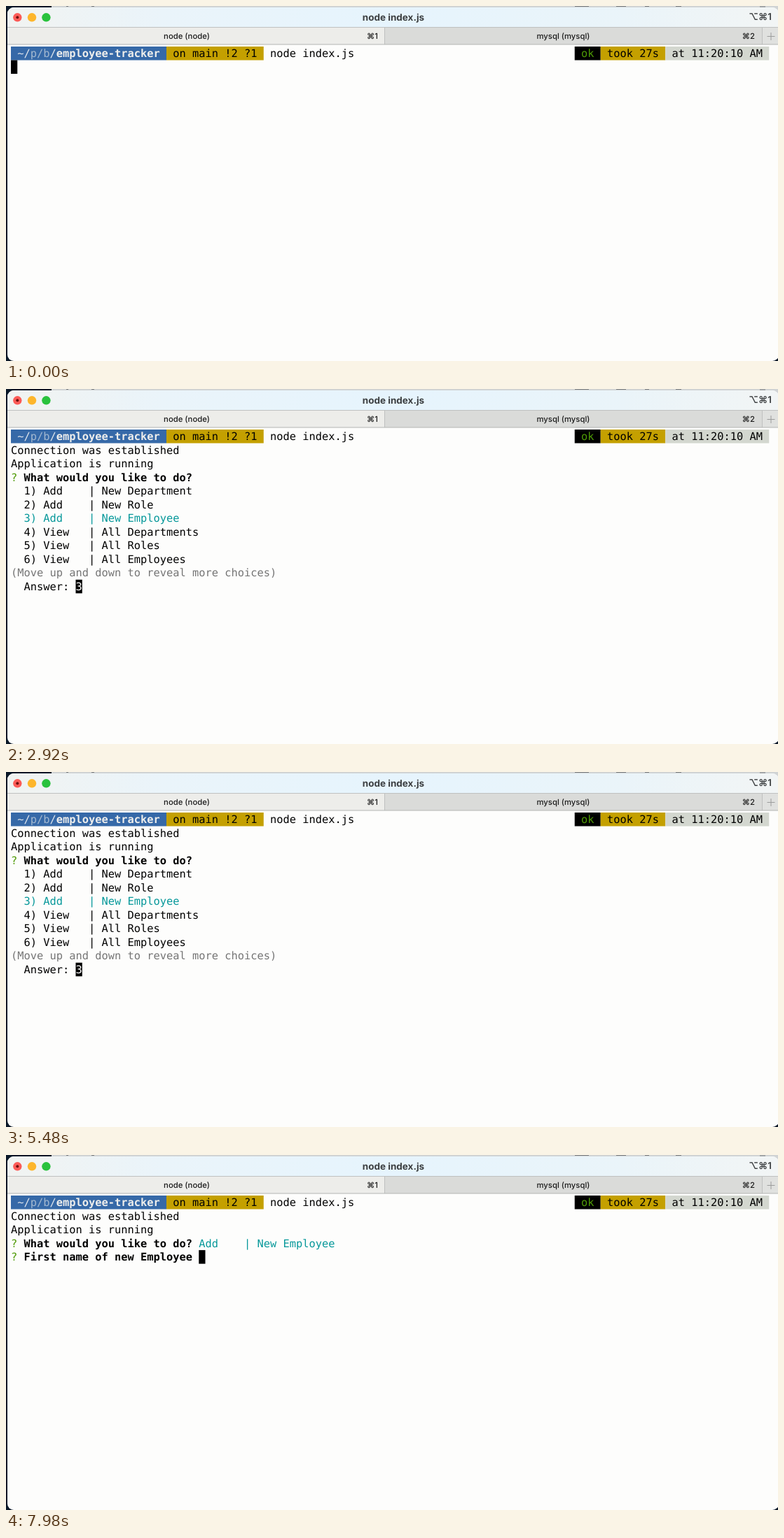
Write an HTML page that moves like this. It is 1102 by 508 pixels and loops after 8 s.

```html
<!DOCTYPE html>
<html lang="en">
<head>
<meta charset="utf-8">
<title>Terminal</title>
<style>
  html, body { margin: 0; width: 100%; height: 100%; overflow: hidden; background: #0b1828; }
  svg { display: block; width: 1102px; height: 508px; }
  text { white-space: pre; text-rendering: geometricPrecision; }
  .mono { font: 15.364px "DejaVu Sans Mono", monospace; }
  .ui { font-family: Inter, "DejaVu Sans", sans-serif; }
  .tab { font-size: 11.3px; font-weight: 500; fill: #1c1c1c; }
  .title { font-size: 13.5px; font-weight: 700; fill: #3c3f41; }
  .bold { font-weight: 700; }
</style>
</head>
<body>
<svg viewBox="0 0 1102 508">
  <defs>
    <linearGradient id="bar">
      <stop offset="0" stop-color="#f1f3f1"/>
      <stop offset=".2" stop-color="#eaf4fa"/>
      <stop offset=".5" stop-color="#e6f4fd"/>
      <stop offset=".8" stop-color="#eaf4f9"/>
      <stop offset="1" stop-color="#f2f5f5"/>
    </linearGradient>
    <clipPath id="window"><rect x="2" y="2" width="1101" height="506" rx="9"/></clipPath>
  </defs>
  <rect width="1102" height="508" fill="#0b1828"/>
  <rect x="65" width="1037" height="12" fill="#d0d3d4"/>
  <path d="M86 .5h3M122 .5h4M812 .5h20M871 .5h14M912 .5h6M956 .5h8M1076 1h8" stroke="#777b7d"/>
  <g clip-path="url(#window)">
    <rect x="2" y="2" width="1101" height="506" fill="#fdfdfc"/>
    <rect x="2" y="2" width="1101" height="29" fill="url(#bar)"/>
    <rect x="2" y="31" width="538" height="24" fill="#ededea"/>
    <rect x="541" y="31" width="539" height="24" fill="#dadbd9"/>
    <rect x="1080" y="31" width="23" height="24" fill="#e0e1df"/>
    <path d="M2 30.5H1103M540.5 31V55M1079.5 31V55" stroke="#bfc1c0" fill="none"/>
    <path d="M2 55H1103" stroke="#b2b4b3"/>
    <path d="M1086.5 43.5h11M1092 38v11" stroke="#9b9c9b"/>
  </g>
  <g>
    <circle cx="16.3" cy="16.3" r="6.2" fill="#fc5b57"/>
    <circle cx="16.3" cy="16.3" r="2" fill="#6d100e"/>
    <circle cx="37" cy="16.3" r="6.2" fill="#fdb62c"/>
    <circle cx="57.4" cy="16.3" r="6.2" fill="#29c23d"/>
  </g>
  <g class="ui">
    <text class="title" x="553" y="20.8" text-anchor="middle">node index.js</text>
    <text class="title" x="1093" y="20" text-anchor="end" style="font-weight:600">⌥⌘1</text>
    <text class="tab" x="258" y="47.3" text-anchor="middle">node (node)</text>
    <text class="tab" x="531" y="47.3" text-anchor="end">⌘1</text>
    <text class="tab" x="795.5" y="47.3" text-anchor="middle">mysql (mysql)</text>
    <text class="tab" x="1069" y="47.3" text-anchor="end">⌘2</text>
  </g>
  <g id="prompt" class="mono"></g>
  <g id="screen" class="mono"></g>
</svg>
<script>
const LOOP = 8000;
const MENU_AT = 420, PICK_AT = 2180, SUBMIT_AT = 6240;
const CELL = 9.25, LINE = 19.53, LEFT = 7, TOP = 58, BASELINE = 15;
const GREEN = '#4e9a06', TEAL = '#06989a', GREY = '#757575', BLACK = '#000';
const BLUE = '#3669a8', GOLD = '#c4a000', SILVER = '#d3d7cf';

const choices = [
  'Add    | New Department',
  'Add    | New Role',
  'Add    | New Employee',
  'View   | All Departments',
  'View   | All Roles',
  'View   | All Employees'
];

function text(row, col, str, fill = BLACK, bold = false) {
  return `<text x="${LEFT + col * CELL}" y="${TOP + row * LINE + BASELINE}" ` +
    `fill="${fill}"${bold ? ' class="bold"' : ''}>${str}</text>`;
}

function block(row, col, cells, fill) {
  return `<rect x="${LEFT + col * CELL}" y="${TOP + row * LINE}" ` +
    `width="${cells * CELL}" height="${LINE}" fill="${fill}"/>`;
}

const cursor = (row, col, char = '') =>
  block(row, col, 1, BLACK) + text(row, col, char, '#fff');

const question = (row, str) => text(row, 0, '?', GREEN) + text(row, 2, str, BLACK, true);

function prompt() {
  return block(0, 0, 24, BLUE) + block(0, 24, 15, GOLD) +
    block(0, 87, 4, BLACK) + block(0, 91, 10, GOLD) + block(0, 101, 16, SILVER) +
    text(0, 1, '~/', '#dfe5ec') + text(0, 3, 'p/b', '#a3b8d0') + text(0, 6, '/', '#dfe5ec') +
    text(0, 7, 'employee-tracker', '#eeeeec', true) +
    text(0, 25, 'on main !2 ?1') + text(0, 40, 'node index.js') +
    text(0, 88, 'ok', GREEN) + text(0, 92, 'took 27s') + text(0, 102, 'at 11:20:10 AM');
}

const header = () =>
  text(1, 0, 'Connection was established') +
  text(2, 0, 'Application is running') +
  question(3, 'What would you like to do?');

function menu(selected, answer) {
  const list = choices.map((label, i) =>
    text(4 + i, 2, `${i + 1}) ${label}`, i === selected ? TEAL : BLACK));
  return header() + list.join('') +
    text(10, 0, '(Move up and down to reveal more choices)', GREY) +
    text(11, 2, 'Answer:') + cursor(11, 10, answer);
}

const nameQuestion = () =>
  header() + text(3, 29, choices[2], TEAL) +
  question(4, 'First name of new Employee') + cursor(4, 29);

const scenes = [
  [SUBMIT_AT, nameQuestion],
  [PICK_AT, () => menu(2, '3')],
  [MENU_AT, () => menu(0, '')],
  [0, () => cursor(1, 0)]
];

const screenGroup = document.getElementById('screen');
let shown;

function render(time) {
  const scene = scenes.find(([start]) => time >= start);
  if (scene === shown) return;
  shown = scene;
  screenGroup.innerHTML = scene[1]();
}

document.getElementById('prompt').innerHTML = prompt();
render(0);

let origin;
function tick(now) {
  origin ??= now;
  render(Math.max(0, now - origin) % LOOP);
  requestAnimationFrame(tick);
}
requestAnimationFrame(tick);
</script>
</body>
</html>
```
